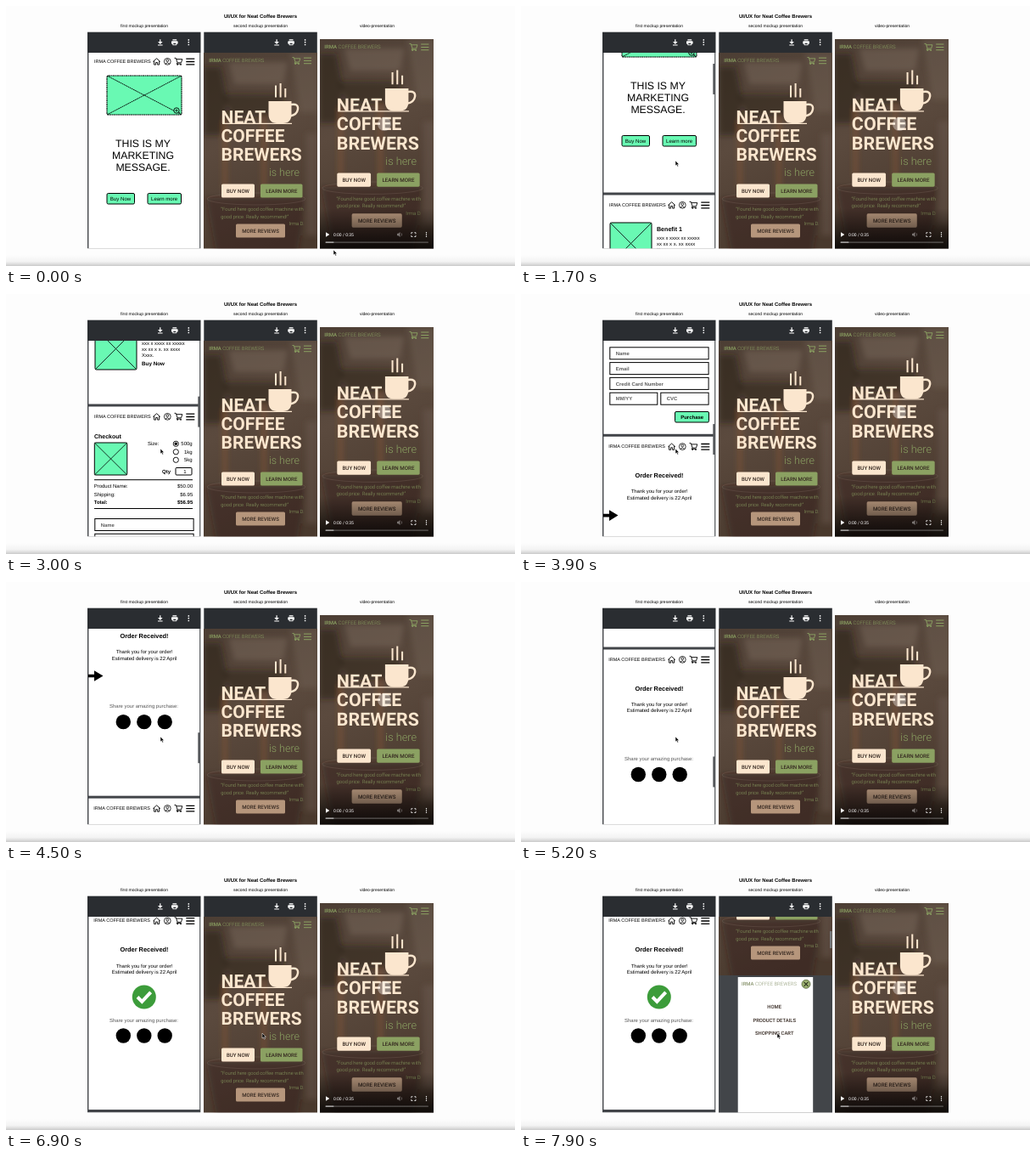
An HTML page that plays this animation: 600 by 306 pixels, repeating every 8000 ms.

```html
<!DOCTYPE html>
<html lang="en">
<head>
<meta charset="utf-8">
<title>Mockup presentation</title>
<style>
  html, body { margin: 0; width: 100%; height: 100%; overflow: hidden; background: #fdfdfd; }
  svg { display: block; width: 100vw; height: 100vh; text-rendering: geometricPrecision; }
  text { font-family: "Liberation Sans", Arial, sans-serif; white-space: pre; }
  .r { font-family: Roboto, sans-serif; }
  .b { font-weight: 700; }
  .m { font-weight: 500; }
  .l { font-weight: 300; }
</style>
</head>
<body>
<svg id="stage" viewBox="0 0 600 306"></svg>
<script>
const MINT = '#69f9b3', GRAY = '#424549', BAR = '#2a2d31';
const CREAM = '#fbe6ce', GREEN = '#8ba162', TAN = '#b6967c', COCOA = '#33261f';
const PAGE = 237, FIRST_PAGE = 52;

// y is the middle of the capitals
const text = (x, y, s, size, { fill = '#000', cls = '', anchor = 'start' } = {}) =>
  `<text x="${x}" y="${y + size * .36}" font-size="${size}" fill="${fill}" class="${cls}" text-anchor="${anchor}">${s}</text>`;
const mid = (x, y, s, size, o = {}) => text(x, y, s, size, { ...o, anchor: 'middle' });
const end = (x, y, s, size, o = {}) => text(x, y, s, size, { ...o, anchor: 'end' });
const rect = (x, y, w, h, fill, more = '') =>
  `<rect x="${x}" y="${y}" width="${w}" height="${h}" fill="${fill}" ${more}/>`;
const circle = (x, y, r, fill, more = '') => `<circle cx="${x}" cy="${y}" r="${r}" fill="${fill}" ${more}/>`;
const line = (d, color, width, more = '') =>
  `<path d="${d}" fill="none" stroke="${color}" stroke-width="${width}" ${more}/>`;
const outlined = (x, y, w, h, fill, r = 1.5) => rect(x, y, w, h, fill, `rx="${r}" stroke="#000" stroke-width="1"`);

const cart = (x, y, color) =>
  line(`M${x - 4.5} ${y - 3.5}h1.8l1.8 5.5h4.4l1.3-4.2h-7M${x - 1} ${y + 2}l-.8 1.3h5.4`, color, .9) +
  circle(x - .8, y + 4, .9, color) + circle(x + 3, y + 4, .9, color);
const burger = (x, y, w, color, width) =>
  line(`M${x} ${y - 3.3}h${w}m-${w} 3.3h${w}m-${w} 3.3h${w}`, color, width);
const placeholder = (x, y, w, h) => outlined(x, y, w, h, MINT) +
  line(`M${x} ${y}l${w} ${h}m0 ${-h}l${-w} ${h}`, '#000', .8);

function toolbar(x) {
  const dots = [-2.8, 0, 2.8].map(d => circle(x + 119.3, 42.7 + d, .85, '#fff')).join('');
  return rect(x, 30.7, 133.5, 24.3, BAR) +
    line(`M${x + 85.8} 39.2v4M${x + 83} 46h5.6`, '#fff', 1.2) +
    `<path d="M${x + 83} 42h5.6l-2.8 2.9z" fill="#fff"/>` +
    rect(x + 99, 41.2, 7.6, 3.6, '#fff', 'rx=".8"') + rect(x + 100.4, 39.2, 4.8, 1.3, '#fff') +
    rect(x + 100.4, 43, 4.8, 3.2, '#fff') + rect(x + 101.3, 43.7, 3, 1.6, BAR) + dots;
}

// First mockup: y runs from the gap above each page
function header(x) {
  return text(x, 13, 'IRMA COFFEE BREWERS', 5.5) +
    line('M173.4 13.5l4.2-3.8 4.2 3.8M174.6 12.7v4.4h2v-2.6h2v2.6h2v-4.4', '#000', .9) +
    circle(190.3, 13.3, 3.9, 'none', 'stroke="#000" stroke-width=".8"') +
    circle(190.3, 12.2, 1.4, 'none', 'stroke="#000" stroke-width=".8"') +
    line('M187.8 16.2q2.5-3 5 0', '#000', .8) + cart(203, 12.8, '#000') + burger(212.3, 13.5, 10, '#000', 1.3);
}

const landing = () => header(104) +
  rect(119, 30, 88, 46, MINT, 'rx="2" stroke="#000" stroke-width="1.1" stroke-dasharray="2 .5"') +
  line('M119 30l88 46m0-46l-88 46', '#000', .9, 'stroke-dasharray="2 .5"') +
  circle(201, 71, 3.2, MINT, 'stroke="#000" stroke-width=".9"') +
  line('M199.4 71h3.2m-1.6-1.6v3.2m2.3-.3l2 2', '#000', .8) +
  ['THIS IS MY', 'MARKETING', 'MESSAGE.'].map((s, i) => mid(161.5, 109.7 + 14 * i, s, 12.3)).join('') +
  outlined(119, 168.5, 32.5, 12.5, MINT) + mid(135, 174.9, 'Buy Now', 6.1) +
  outlined(167, 168.5, 39.5, 12.5, MINT) + mid(186.6, 174.9, 'Learn more', 6.1);

const benefits = () => header(104) + [0, 1, 2].map(i => {
  const y = 34 + 56 * i;
  return placeholder(105, y, 49, 49) + text(160, y + 7.2, `Benefit ${i + 1}`, 7.1, { cls: 'b' }) +
    ['xxx x xxxx xx xxxxx', 'xx xx x x. xx xxxx', 'Xxxx.'].map((s, n) => text(160, y + 18 + 7 * n, s, 5.9)).join('') +
    text(160, y + 42, 'Buy Now', 6.3, { cls: 'b' });
}).join('');

function checkout() {
  const sizes = ['500g', '1kg', '5kg'].map((s, i) => {
    const y = 45.3 + 9.5 * i;
    return circle(200.3, y, 3.1, '#fff', 'stroke="#000" stroke-width=".9"') +
      (i ? '' : circle(200.3, y, 1.7, '#000')) + end(219.7, y, s, 6);
  }).join('');
  const sums = [['Product Name:', '$50.00'], ['Shipping:', '$6.95'], ['Total:', '$56.95']].map(([a, b], i) => {
    const o = { cls: i == 2 ? 'b' : '' }, y = 95.3 + 9.5 * i;
    return text(103.7, y, a, 6, o) + end(220.3, y, b, 6, o);
  }).join('');
  const field = (x, y, w, s) => rect(x, y, w, 14, '#fff', 'stroke="#000" stroke-width="1"') +
    text(x + 7, y + 7.1, s, 5.9, { cls: 'b', fill: '#5c5c5c' });
  return header(104) + text(104, 36.7, 'Checkout', 7, { cls: 'b' }) + placeholder(104.3, 44, 38.5, 38) +
    text(167, 45.3, 'Size:', 6) + sizes + text(184, 78, 'Qty', 6, { cls: 'b' }) +
    outlined(200, 73.5, 19, 8.5, '#fff', 1) + mid(211, 78, '1', 6) +
    line('M104 87.7h116M104 121.5h116', '#000', 1) + sums +
    field(104.8, 133.5, 116.3, 'Name') + field(104.8, 151.3, 116.3, 'Email') +
    field(104.8, 169.1, 116.3, 'Credit Card Number') + field(104.8, 186.9, 56, 'MM/YY') + field(164.8, 186.9, 56.3, 'CVC') +
    outlined(181.5, 209.2, 40, 12.5, MINT) + mid(201.7, 215.5, 'Purchase', 6, { cls: 'b' });
}

const received = extra => header(103.2) + mid(163, 47, 'Order Received!', 7.4, { cls: 'b' }) +
  mid(163, 65.9, 'Thank you for your order!', 5.95) + mid(163, 73.2, 'Estimated delivery is 22 April', 6) + extra +
  mid(162.5, 130.2, 'Share your amazing purchase:', 5.95, { fill: '#555' }) +
  [138.3, 162.8, 187.2].map(x => circle(x, 148.5, 8.7, '#000')).join('');

const arrow = '<path d="M97 92.500h7v-4.500l10.500 6.300-10.500 6.300v-4.500h-7z"/>';
const tick = circle(162.8, 103, 14, '#3c9c3a') + line('M155 103l5.300 5.300 10.300-11', '#fff', 4);
const firstDoc = [landing(), benefits(), checkout(), received(arrow), received(''), received(tick)]
  .map((body, i) => `<g transform="translate(0 ${FIRST_PAGE + PAGE * i})">` +
    rect(97.4, 1.5, 130.8, PAGE - 3, '#fff') + body + '</g>').join('');

// Second mockup, also shown in the video
const brand = (x, y, color) =>
  `<text class="r l" x="${x}" y="${y + 2.1}" font-size="5.9" fill="${color}"><tspan class="m">IRMA</tspan> COFFEE BREWERS</text>`;

const photo = rect(233, 55, 134, 250, 'url(#coffee)') +
  `<g filter="url(#soft)">
    <path d="M233 72h20l8 40-6 40h-22z" fill="#2b2019" opacity=".55"/>
    <path d="M262 66h70l-5 26h-58z" fill="#837265" opacity=".4"/>
    <path d="M335 55h32v70h-20z" fill="#77675b" opacity=".35"/>
    <path d="M256 104h74l-12 26h-52z" fill="#2a1e17" opacity=".5"/>
    <path d="M256 134h4v80h-4zM302 130h4v90h-4z" fill="#9a5d35" opacity=".5"/>
    <path d="M236 226h118l-12 75h-92z" fill="#2f2018" opacity=".4"/>
    <path d="M354 150h13v120h-13z" fill="#76655a" opacity=".35"/>
  </g>
  <ellipse cx="295" cy="227" rx="58" ry="7" fill="none" stroke="#8d7a6b" opacity=".25"/>`;

const button = (x, y, w, h, fill, s) => rect(x, y, w, h, fill, 'rx="1.6"') +
  mid(x + w / 2, y + h / 2, s, 6.1, { cls: 'r m', fill: COCOA });

const cup = line('M318 93.5v14M323.6 91v16.5M329.3 97v10.5', CREAM, 2) +
  `<path d="M309.5 112h27v15q0 11-10 11h-7q-10 0-10-11z" fill="${CREAM}"/>` +
  line('M336 116q9-1.5 8 5.5-1 6.5-9 8', CREAM, 2.4) + line('M255 138.4h82', CREAM, 1.3);

const hero = photo + brand(239.3, 64.2, GREEN) + cart(342, 64, GREEN) + burger(351, 64.4, 9, GREEN, 1) + cup +
  ['NEAT', 'COFFEE', 'BREWERS'].map((s, i) => text(253.6, 130.5 + 22.1 * i, s, 21, { cls: 'r b', fill: CREAM })).join('') +
  end(346, 195.7, 'is here', 12.5, { cls: 'r l', fill: GREEN }) +
  button(254, 209.5, 39, 16, CREAM, 'BUY NOW') + button(300, 209.5, 49.5, 16, GREEN, 'LEARN MORE') +
  text(253.3, 239, '“Found here good coffee machine with', 5.8, { cls: 'r l', fill: GREEN }) +
  text(253.3, 247.5, 'good price. Really recommend!”', 5.8, { cls: 'r l', fill: GREEN }) +
  end(351.5, 256, 'Irma D.', 5.8, { cls: 'r l', fill: GREEN }) +
  button(271, 256.5, 58, 16, TAN, 'MORE REVIEWS');

const menu = rect(233, 291, 134, 300, GRAY) + rect(255.7, 293, 88.5, 250, '#fff') +
  brand(260, 301.3, '#87936c') + circle(336, 301.3, 5, '#9db272', 'stroke="#55633a" stroke-width=".8"') +
  line('M333.5 298.8l5 5m0-5l-5 5', '#2d331f', 1.1) +
  ['HOME', 'PRODUCT DETAILS', 'SHOPPING CART'].map((s, i) => mid(298.7, 328.3 + 15.5 * i, s, 5.9, { cls: 'r m', fill: COCOA })).join('');

const controls = rect(370, 238, 134, 48, 'url(#shade)') +
  '<path d="M377 266.3v5.4l4.3-2.7z" fill="#fff"/>' +
  text(386, 269, '0:00 / 0:35', 5, { cls: 'r', fill: '#fff' }) +
  '<g opacity=".4"><path d="M461 267.8h1.5l2-1.8v6l-2-1.8h-1.500z" fill="#fff"/>' +
  line('M466 267.3q1.5 1.7 0 3.4', '#fff', .7) + '</g>' +
  line('M477.8 268.3v-1.6h1.6m2 0h1.6v1.6m0 1.6v1.6h-1.6m-2 0h-1.6v-1.6', '#fff', .8) +
  [-2.2, 0, 2.2].map(d => circle(495.5, 269 + d, .7, '#fff')).join('') +
  rect(376.5, 277.5, 121.5, 1.2, '#fff', 'opacity=".3" rx=".6"') + rect(376.5, 277.5, 10, 1.2, '#fff', 'opacity=".6" rx=".6"');

const clip = (id, x, y, w, h) => `<clipPath id="${id}">${rect(x, y, w, h, '#000')}</clipPath>`;

document.getElementById('stage').innerHTML = `<defs>
    <linearGradient id="coffee" x1="0" y1="0" x2=".25" y2="1">
      <stop offset="0" stop-color="#4c3e34"/><stop offset=".45" stop-color="#5b4a3e"/><stop offset="1" stop-color="#49392d"/>
    </linearGradient>
    <linearGradient id="shade" x1="0" y1="0" x2="0" y2="1">
      <stop offset="0" stop-color="#000" stop-opacity="0"/><stop offset="1" stop-color="#000" stop-opacity=".8"/>
    </linearGradient>
    <linearGradient id="floor" x1="0" y1="0" x2="0" y2="1">
      <stop offset="0" stop-color="#000" stop-opacity="0"/><stop offset=".6" stop-color="#000" stop-opacity=".04"/>
      <stop offset="1" stop-color="#000" stop-opacity=".2"/>
    </linearGradient>
    <filter id="soft"><feGaussianBlur stdDeviation="3"/></filter>
    ${clip('view1', 96, 55, 133.3, 230.3)}${clip('view2', 233, 55, 134, 230.5)}${clip('view3', 370, 39, 134, 246.5)}
  </defs>` +
  rect(0, 0, 600, 306, '#fdfdfd') + rect(0, 293, 600, 13, 'url(#floor)') +
  mid(300, 11.7, 'UI/UX for Neat Coffee Brewers', 6, { cls: 'b' }) +
  mid(163, 23, 'first mockup presentation', 5) + mid(300, 23, 'second mockup presentation', 5) +
  mid(437.5, 23, 'video-presentation', 5) +
  `<g clip-path="url(#view1)">${rect(96, 55, 134, 231, GRAY)}<g id="doc1">${firstDoc}</g>
    ${rect(226.3, 0, 2.7, 36, '#55585b', 'id="thumb1"')}</g>
  <g clip-path="url(#view2)"><g id="doc2">${hero}${menu}</g>${rect(364, 0, 2.5, 20, '#777a7d', 'id="thumb2"')}</g>
  <g clip-path="url(#view3)"><g transform="translate(131.2 -17.3) scale(1.02)">${hero}</g>
    ${circle(446, 139, 8, '#fff', 'opacity=".35"')}${controls}</g>` +
  toolbar(96) + toolbar(233.3) +
  '<path id="cursor" d="M0 0v6.1l1.4-1.3 1 2.3 1.1-.5-1-2.2h1.9z" fill="#000" stroke="#fff" stroke-width=".5"/>';

const [doc1, doc2, thumb1, thumb2, cursor] =
  ['doc1', 'doc2', 'thumb1', 'thumb2', 'cursor'].map(id => document.getElementById(id));

// Linear interpolation between [time, value] pairs
function track(t, keys) {
  const next = keys.findIndex(k => k[0] > t);
  if (next < 0) return keys[keys.length - 1][1];
  if (next == 0) return keys[0][1];
  const [t0, a] = keys[next - 1], [t1, b] = keys[next];
  return a + (b - a) * (t - t0) / (t1 - t0);
}
const smooth = p => p * p * (3 - 2 * p);
const move = (node, x, y) => node.setAttribute('transform', `translate(${x} ${y})`);

function draw(now) {
  const t = Math.floor(now / 100) * 100 % 8000;
  const scroll1 = track(t, [[1350, 0], [1700, 68], [3000, 395], [3900, 596.7], [5200, 922], [6300, 1190.5]]);
  const scroll2 = track(t, [[7300, 0], [7900, 167]]);
  move(doc1, 0, -scroll1);
  move(doc2, 0, -scroll2);
  move(thumb1, 0, 57 + scroll1 * .161);
  move(thumb2, 0, 57 + scroll2 * .09);
  thumb1.setAttribute('opacity', t > 1350 ? track(t, [[6500, 1], [6800, 0]]) : 0);
  thumb2.setAttribute('opacity', scroll2 ? 1 : 0);

  const toFirst = smooth(track(t, [[100, 0], [1000, 1]]));
  const toSecond = smooth(track(t, [[6400, 0], [6900, 1]]));
  move(cursor, 386 - 204 * toFirst + 120 * toSecond, 287 - 105 * toFirst + 10 * toSecond);
  requestAnimationFrame(draw);
}
requestAnimationFrame(draw);
</script>
</body>
</html>
```
